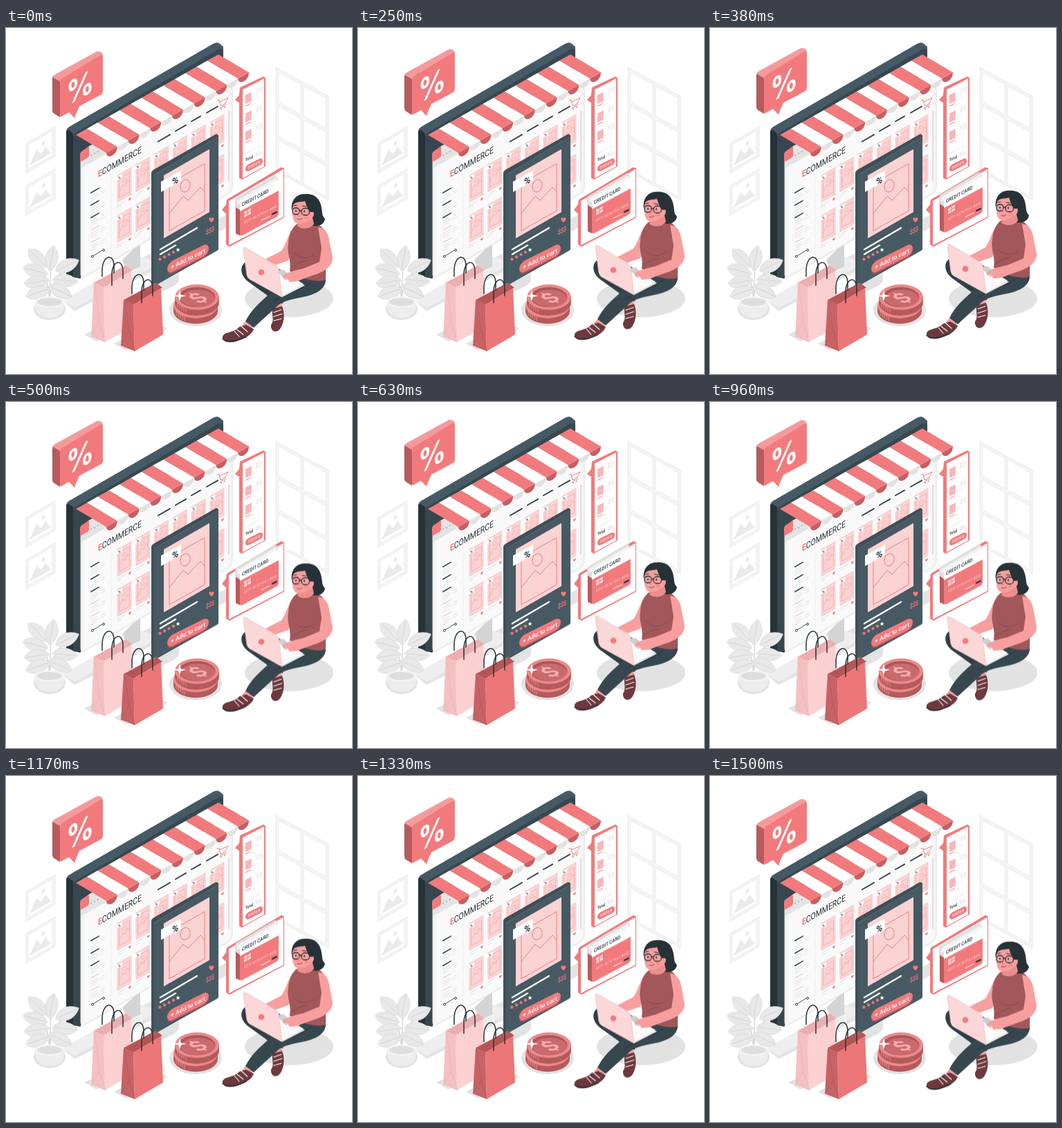
Recreate the animation shown at these times as an HTML page. Size 500x500 px, loop 1.54 s.

```html
<!DOCTYPE html>
<html lang="en">
<head>
<meta charset="utf-8">
<title>Online shop</title>
<style>
html, body { margin: 0; width: 100%; height: 100%; overflow: hidden; background: #fff; }
svg { display: block; width: 100vw; height: 100vh; }
text { font-family: Roboto, Inter, sans-serif; }
.big { font-family: Inter, sans-serif; }
.ln { fill: none; stroke-linecap: round; stroke-linejoin: round; }
</style>
</head>
<body>
<svg id="stage" viewBox="0 0 500 500"></svg>
<script>
const RED = '#f27a7c', DEEP = '#b65b5e', PALE = '#fbd3d3', DARK = '#37474f', INK = '#263238', SKIN = '#f79f9e';

const poly = (pts, fill, more = '') => `<polygon points="${pts}" fill="${fill}" ${more}/>`;
const path = (d, fill, more = '') => `<path d="${d}" fill="${fill}" ${more}/>`;
const line = (d, color, w = 1) => `<path class="ln" d="${d}" stroke="${color}" stroke-width="${w}"/>`;
const rect = (x, y, w, h, fill, more = '') => `<rect x="${x}" y="${y}" width="${w}" height="${h}" fill="${fill}" ${more}/>`;
const oval = (x, y, rx, ry, fill, more = '') => `<ellipse cx="${x}" cy="${y}" rx="${rx}" ry="${ry}" fill="${fill}" ${more}/>`;
const text = (x, y, size, fill, s, more = '') => `<text x="${x}" y="${y}" font-size="${size}" fill="${fill}" ${more}>${s}</text>`;
const plane = (x, y, body, k = -.575, sx = 1) => `<g transform="matrix(${sx} ${k * sx} 0 1 ${x} ${y})">${body}</g>`;
const repeat = (n, fn) => Array.from({ length: n }, (_, i) => fn(i)).join('');
const heart = (x, y, s) => path('M0 2C-4-1-2-4 0-2C2-4 4-1 0 2Z', RED, `transform="translate(${x} ${y}) scale(${s})"`);

function windowPane() {
  const cells = repeat(6, i => rect(4 + (i % 2) * 36, 5 + (i >> 1) * 49, 32, 43, '#fff', 'stroke="#e9e9e9" stroke-width=".8"'));
  return plane(390, 57, rect(0, 0, 76, 150, '#f4f4f4', 'stroke="#e9e9e9"') + cells, .547);
}

function wallPicture(y) {
  return plane(29, y, rect(0, 0, 42, 43, '#f4f4f4', 'stroke="#e9e9e9"') +
    rect(3, 4, 35, 35, '#fff', 'stroke="#eee"') +
    path('M5 35L15 18L22 28L28 21L36 35Z', '#eaeaea') + oval(25, 14, 2.5, 3, '#ebebeb'), -.58);
}

function plant() {
  const leaves = [[66, 332, -80], [46, 333, 45], [89, 343, -25], [43, 351, 15], [86, 365, 5], [45, 367, -8], [47, 382, -20], [79, 381, 25]];
  return oval(63, 406, 23, 16, '#e3e3e3') +
    line('M64 395C62 375 66 350 66 320M63 392C61 370 54 350 46 337M63 390C65 370 77 353 92 342', '#cfcfcf', 1.2) +
    leaves.map(([x, y, a]) => `<g transform="translate(${x} ${y}) rotate(${a})">` +
      path('M-19 0C-10-13 7-12 18 0C7 12-10 12-19 0Z', '#e8e8e8', 'stroke="#d8d8d8" stroke-width=".7"') +
      line('M-15 0H15', '#d2d2d2', .8) + '</g>').join('') +
    path('M41 396C42 407 46 419 63 419S84 407 85 396Z', '#ededed') +
    oval(63, 396, 22, 8, '#f5f5f5') + oval(63, 396, 18, 6, '#dedede');
}

function product(c, r) {
  return plane(161 + c * 26.8, 213 - c * 15.4 + r * 58,
    rect(0, 0, 20, 39, PALE, 'stroke="#f7bfc0" stroke-width=".5"') +
    rect(2.5, 6, 15, 28, 'none', 'stroke="#f5a3a4" stroke-width=".6"') +
    line('M3 26L8 18L11 22L15 15L17 19', '#f5a3a4', .6) +
    oval(10, 13, 2.3, 2.5, 'none', 'stroke="#f5a3a4" stroke-width=".5"') +
    rect(-1, 2, 8, 5, '#fff') + text(1, 6.5, 5, DARK, '%', 'font-weight="700"') +
    line('M0 43H11M0 46.5H6', '#dcdcdc', .9) + heart(18, 45, .8));
}

function monitor() {
  const side = repeat(5, i => plane(123, 238 + i * 18,
    line('M0 0H11', i < 3 ? DARK : '#ccc', i < 3 ? 1.8 : 1) +
    line('M0 5H9M0 8.5H11M0 12H8', '#dedede', .9) +
    line('M15 6.5H20M15 10H20', '#e4e4e4', 1.1)));
  const nav = [[220, 164, 17], [245, 149, 15], [268, 135, 13], [290, 122.5, 16]];
  return poly('84,396 195,333 318,270 334,279 215,350 99,409', '#e4e4e4') +
    poly('84,392 195,330 215,338 215,344 99,404 84,396', '#eeeeee') +
    poly('168,335 194,310 194,345 176,352', '#d4d4d4') +
    path('M87 358V150Q87 146 91 143L299 23Q304 20 308 22L314 27V60L107 362L97 360Z', '#455a64') +
    path('M97 360V157Q97 153 101 151L307 31Q314 28 314 36V70L108 190V362Z', DARK) +
    path('M87 358V150Q88 147 90 147L97 152V360Z', INK) +
    path('M108 182L327 56V228Q327 237 321 240L113 360Q108 363 108 355Z', '#f5f5f5', 'stroke="#dedede" stroke-width="1"') +
    poly('113,190 321,70 321,237 113,357', '#f9f9f9') +
    path('M118 172L165 145V170L108 203V192Z', '#e4e4e4') +
    path('M107 194V183Q107 179 111 177L120 171V185Q119 187 117 188Z', RED) +
    plane(122, 188, text(0, 0, 8, '#8b8b8b', '• • •')) +
    plane(133, 216, text(0, 0, 13, INK, `<tspan fill="${RED}" font-weight="700">E</tspan>COMMERCE`), -.575, .8) +
    nav.map(([x, y, w]) => line(`M${x} ${y}l${w} ${-w * .575}`, DARK, 2)).join('') +
    `<g transform="translate(-5 -1)">` +
    line('M310 106L313 105L315 114L321 111L326 102L313 108M314 117L323 112', RED, .9) +
    oval(316, 118, 1, 1, RED) + oval(321, 115.5, 1, 1, RED) + '</g>' +
    line('M152 205V334', '#ededed', 1) + side +
    line('M125 330L141 320', DARK, .9) + oval(125, 330, 1.5, 1.6, '#fff', `stroke="${DARK}"`) + oval(141, 321, 1.5, 1.6, '#fff', `stroke="${DARK}"`) +
    repeat(12, i => product(i % 6, i / 6 | 0)) +
    line('M322 120V220', '#dedede', 2);
}

function awning() {
  const n = 13, w = 15.85, rise = 8.95;
  return repeat(n, i => {
    const x = 101 + i * w, y = 154.5 - i * rise, bx = x + 44, by = y + 26, red = i % 2 === 0;
    return path(`M${bx} ${by}C${bx} ${by + 10} ${bx + w} ${by - rise + 13} ${bx + w} ${by - rise}Z`, red ? '#c75f62' : '#e2e2e2') +
      poly(`${x},${y} ${x + w},${y - rise} ${bx + w},${by - rise} ${bx},${by}`, red ? RED : '#fff');
  });
}

function productPanel() {
  const star = 'M0-3L.9-1L3-.9L1.4.6L2 2.8L0 1.6L-2 2.8L-1.4.6L-3-.9L-.9-1Z';
  return path('M210 374L250 354V364Q249 369 240 374L215 386Z', '#e2e2e2') +
    path('M210 209Q210 207 213 205L304 153L307 155V319L214 373L210 371Z', DARK, 'fill-opacity=".95"') +
    path('M214 212L307 157V319Q307 321 305 322L214 373Z', '#485b65', 'fill-opacity=".93"') +
    line('M214 212L307 157', '#5d717b', .8) +
    poly('228,213 294,175 294,266 228,304', PALE) +
    poly('236,225 287,196 287,264 236,293', 'none', `stroke="${RED}" stroke-width="1"`) +
    line('M236 268L256 243L263 249L281 230L287 237', RED, 1) +
    oval(259, 228, 7, 9, 'none', `stroke="${RED}" stroke-width="1" transform="rotate(15 259 228)"`) +
    poly('224,222 253,206 253,221 224,237', '#fff') +
    plane(240, 228, text(0, 0, 14, INK, '%', 'font-weight="700"'), -.575, .9) +
    line('M223 320L276 289M223 327L245 314', '#fff', 2.5) + heart(297, 278, 1.5) +
    plane(289, 299, text(0, 0, 9.5, RED, '$$$', 'font-weight="500"'), -.52, .75) +
    repeat(5, i => path(star, i < 4 ? RED : '#fff', `transform="translate(${222.5 + i * 6.5} ${334 - i * 3.4})"`)) +
    plane(233, 341, rect(0, 1, 60, 16, DEEP, 'rx="8"') + rect(0, -1, 60, 16, RED, 'rx="8"') +
      text(30, 10.5, 8.7, '#fff', '+ Add to cart', 'text-anchor="middle" font-weight="500"'), -.5);
}

function orderPanel() {
  const item = i => plane(346, 97 + i * 26.5,
    rect(0, 0, 9.5, 13, '#f8b6b7') + text(16, 6, 9, '#dadada', '$$') +
    line('M0 16H8', RED, .9) + line('M0 19H15', '#e4e4e4', .9) + line('M11 11H20', '#e6e6e6', .8), -.5, .93);
  return path('M338 86L372 70L375 72V200L341 219L337 217V108L331 104L337 97Z', RED) +
    path('M342 89L373 73V200L342 217Z', '#fff') +
    repeat(3, item) + line('M346 181L370 169', '#e4e4e4', .8) +
    plane(346, 193, text(0, 0, 6, INK, 'Total', 'font-weight="500"') + text(17, 0, 6, '#ccc', '$$$'), -.5, .85) +
    plane(346, 199, rect(0, 0, 25, 10, RED, 'rx="5"') + text(12.5, 7, 5.5, '#fff', 'ORDER', 'text-anchor="middle"'), -.5);
}

function cardPanel() {
  return path('M319 248L398 201L402 203V274L323 316L318 313V268L312 263L318 255Z', RED) +
    path('M322 250L401 204V273L322 314Z', '#fff');
}

function creditCard() {
  return path('M331 249Q331 247 334 245L387 214Q390 212 392 215L394 222L338 254V299L332 296Z', '#dedede') +
    poly('334,249 391,216 391,224 334,256', '#f2f2f2') +
    poly('332,259 338,263 338,300 332,297', DEEP) +
    poly('338,251 394,219 394,238 338,266', '#fff') +
    path('M338 265L394 235V268Q394 271 391 273L341 300Q338 301 338 298Z', RED) +
    plane(341, 258, text(0, 0, 7.4, INK, 'CREDIT CARD', 'font-weight="500"'), -.53, .84) +
    plane(344, 266, rect(0, 0, 10, 8, PALE) + line('M0 4H10M5 0V8', RED, .8)) +
    plane(344, 283, text(0, 0, 4.9, '#fde3e3', '0271 4278 9161 8052', 'letter-spacing=".2"'), -.5, .93) +
    line('M369 278L381 272', '#fde3e3', 1.1) + line('M385 269L391 266', INK, 2);
}

function bag(x, y, h, side, front, fold) {
  return `<g transform="translate(${x} ${y})">` +
    poly(`-14,${h - 11} 4,${h - 1} 64,${h - 33} 45,${h - 41}`, '#e2e2e2') +
    poly('0,0 46,-25 56,-18 14,7', fold) +
    line('M12-9V-20C13-40 29-43 29-24V-14', INK, 1.5) +
    poly(`0,0 14,7 16,${h} -4,${h - 8}`, side) + poly(`14,7 54,-17 57,${h - 24} 16,${h}`, front) +
    line(`M1 1L8 ${h - 28}L-4 ${h - 8}M8 ${h - 28}L16 ${h}`, fold, .7) +
    line('M26 4V-13C27-33 42-35 42-16V-6', INK, 1.5) + '</g>';
}

function coin(x, y, face) {
  return path(`M${x - 32} ${y}V${y + 8}A32 18.5 0 0 0 ${x + 32} ${y + 8}V${y}Z`, '#b45a5d') +
    repeat(5, i => line(`M${x - 28 + i * 3} ${y + 9 + i * 2}v5`, '#e98e90', 1)) +
    oval(x, y, 32, 18.5, '#ec8889') + oval(x, y, 26.5, 14.5, '#a9565a') +
    (face ? oval(x + 1, y + 1.5, 24.5, 12.5, '#c96b6e') +
      text(0, 13, 36, '#f7abac', '$', `text-anchor="middle" font-weight="700" transform="matrix(.72 -.4 .72 .4 ${x + 1} ${y + 1})"`) : '');
}

function coins() {
  return oval(274, 408, 38, 23, '#e2e2e2') + coin(274, 401, false) + coin(276, 389, true) +
    path('M241 387L249 385.8L251 379L253 385.8L261 387L253 388.5L251 395L249 388.5Z', '#fff');
}

function badge() {
  return path('M67 73Q67 69 71 67L131 34Q135 33 139 36L140 40L78 77V128L70 124Q67 122 67 119Z', '#f59a9b') +
    path('M67 71L78 77V129L70 124Q67 122 67 119Z', DEEP) +
    poly('90,120 97,128 100,130 96,116', DEEP) +
    path('M78 79Q78 75 81 73L135 40Q140 37 140 42V91Q140 95 136 97L106 113L99 129L91 122L80 128Q78 129 78 125Z', RED) +
    plane(107, 102, text(0, 0, 46, '#fff', '%', 'class="big" font-weight="700" text-anchor="middle"'), -.575, .86);
}

function shoes() {
  return poly('386,398 398,396 399,406 386,409', SKIN) +
    path('M385 406L399 402C404 415 401 428 396 435C390 442 382 438 383 429C388 423 384 415 385 406Z', '#6d393e') +
    line('M387 411L398 407M387 417L399 413M387 423L398 420', '#fff', 1.1) +
    poly('346,424 357,432 353,437 341,430', SKIN) +
    path('M347 429L358 435C355 444 344 449 335 452C325 456 312 455 313 446C316 438 330 441 337 432Z', '#6d393e') +
    line('M313 449C320 455 334 453 347 446', INK, 1.6) +
    line('M334 436L343 443M330 438L337 446M340 431L349 439', '#fff', 1.1);
}

function woman() {
  return path('M345 339C337 346 339 359 352 368L377 386L386 401L400 398L404 380L415 360L380 340Z', '#2f3f47') +
    shoes() +
    path('M402 360L461 356C465 370 458 380 440 386C424 391 407 391 394 400L358 433L346 424C354 408 366 397 380 385Z', DARK) +
    line('M441 368C425 379 403 384 387 395', INK, .9) +
    path('M413 292C406 303 404 314 398 322L375 334L382 345L408 336L418 314Z', SKIN) +
    path('M421 283L445 281C456 285 463 292 463 306L462 364C447 369 423 361 410 351C413 336 405 324 408 311C409 298 413 288 421 283Z', '#a2575a') +
    line('M417 326C424 334 438 334 446 327M412 346C422 340 427 337 435 336', '#874548', .8) +
    path('M451 288C462 289 466 297 468 311L472 332C472 346 458 353 442 358L417 367L406 359L419 352L453 338L456 318Z', SKIN) +
    poly('350,361 399,389 432,372 386,345', '#e4e4e4') +
    poly('384,345 399,387 430,370 404,354', '#fafafa') + poly('392,351 404,365 414,360 401,349', '#cfcfcf') +
    path('M343 320Q343 316 347 318L390 343Q393 345 394 349L399 389L352 363Q349 361 348 357Z', '#fbd7d7', 'stroke="#f0bdbd" stroke-width=".7"') +
    oval(369, 353, 4.3, 4.3, RED) +
    path('M428 348C416 351 407 353 401 357L400 362L406 361L410 367L421 366L434 360Z', SKIN) +
    path('M416 254C418 242 430 237 442 241C454 245 456 257 457 267C457 272 460 274 461 276C459 285 450 288 441 285L432 262Z', INK) +
    path('M423 279L442 270L445 283C440 291 427 292 421 286Z', '#ed8e8e') +
    path('M415 251C413 262 413 273 417 280C422 285 432 283 438 277C446 275 447 264 441 263L434 250Z', SKIN) +
    path('M413 264C411 250 419 239 433 240C445 241 450 254 444 266L440 266C435 261 434 255 432 250C426 252 419 250 415 256Z', INK) +
    `<g fill="none" stroke="${INK}" stroke-width="1.3"><rect x="414" y="260" width="10" height="9.5" rx="4.2"/><rect x="427" y="260.5" width="11.5" height="10" rx="4.6"/><path d="M424 264H427M438 264L445 262"/></g>` +
    oval(419, 264.5, 1, 1.4, INK) + oval(431, 265, 1, 1.4, INK) +
    line('M416 257L420 256M428 257L434 258', INK, 1) + line('M424 266L422 271L424 272', '#cf6e70', .8) +
    line('M421 276Q425 278 428 275', '#9d4549', 1) +
    oval(434, 274, 3, 2, RED, 'opacity=".45"');
}

const floating = body => `<g class="float">${body}</g>`;

document.getElementById('stage').innerHTML =
  windowPane() + wallPicture(167) + wallPicture(228) + monitor() + awning() +
  plant() + productPanel() + orderPanel() + cardPanel() + floating(creditCard()) +
  bag(127, 368, 86, '#f5c0c1', '#fbd0d0', '#eeaeaf') + bag(170, 393, 74, '#c76265', '#ec7678', '#b65558') +
  coins() + oval(409, 391, 64, 27, '#e2e2e2') + floating(woman()) + floating(badge());

for (const el of document.querySelectorAll('.float')) {
  el.animate(
    [0, -10, 0].map(y => ({ transform: `translateY(${y}px)` })),
    { duration: 1540, iterations: Infinity, easing: 'linear' }
  );
}
</script>
</body>
</html>
```
